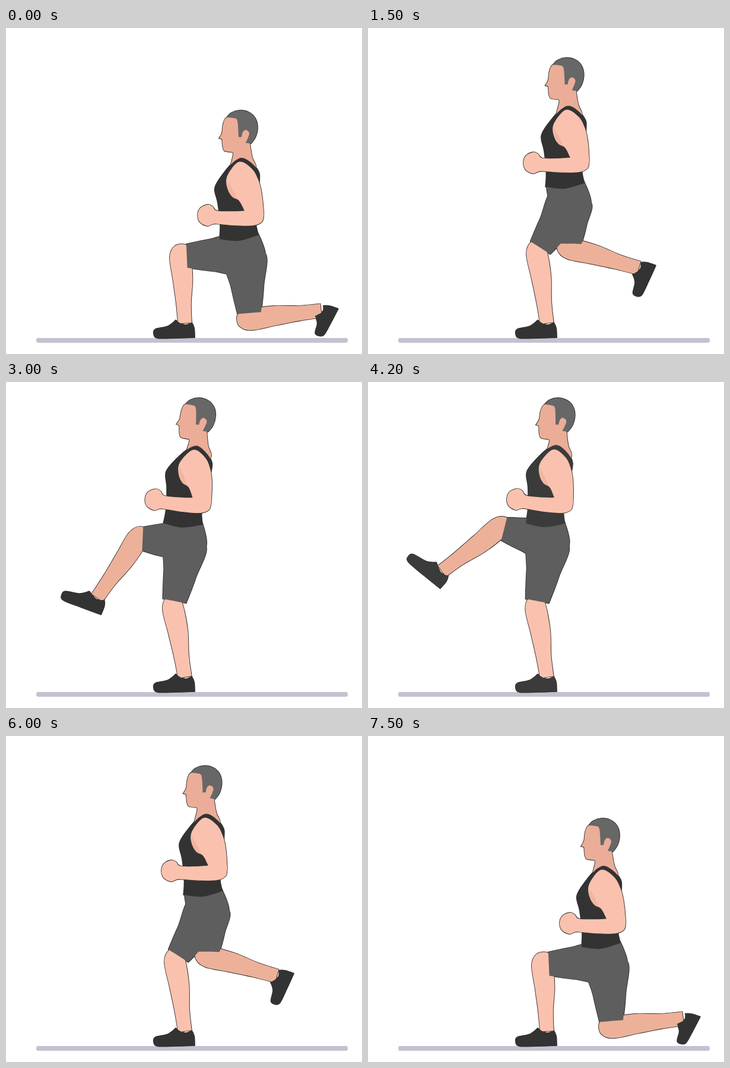
Write an HTML page with a canvas that moves like this. It is 600x550 px and loops after 7800 ms.

```html
<!DOCTYPE html>
<html lang="en">
<head>
<meta charset="utf-8">
<title>Lunge to front kick</title>
<style>
  html, body { margin: 0; width: 100%; height: 100%; overflow: hidden; background: #fff; }
  canvas { display: block; }
</style>
</head>
<body>
<canvas id="stage" width="600" height="550"></canvas>
<script>
const ctx = document.getElementById('stage').getContext('2d');
const STEP = 300, POSES = 13, SHIN = 121, HEM = .9;
const SKIN = '#fac2ae', FACE_SKIN = '#ebad97', FAR_SKIN = '#edb19a', SHORTS = '#5e5e5e', HAIR_GRAY = '#676767';

// Progress of each pose: 0 kneeling, 1 lunge, 2 knee up, 3 kick.
const PROGRESS = [0, .52, .6, 1, 1.33, 1.57, 1.85, 2, 2.15, 2.4, 2.75, 3, 3.06];

// Progress, then x, y of crown, chin, shoulder, elbow, fist, waist, near knee.
const BODY = [
  [0, 394, 139, 371, 208, 397, 245, 418, 318, 340, 316, 393, 353, 294, 385],
  [1, 360, 81, 340, 151, 370, 187, 398, 257, 321, 264, 379, 296, 294, 379],
  [2, 314, 27, 288, 96, 313, 134, 325, 206, 247, 200, 297, 242, 278, 380],
  [3, 320, 27, 294, 95, 315, 133, 329, 206, 251, 198, 299, 239, 283, 381]
];

// Progress, then far knee x, y, shin angle, foot angle, foot length.
const FAR_LEG = [
  [0, 411, 492, -7, 96, 41],
  [1, 436, 411, 32, 110, 46],
  [1.57, 340, 372, 16, 95, 46],
  [1.85, 268, 341, 33, 108, 48],
  [2, 226, 319, 70, 127, 53],
  [3, 221, 246, 143, 204, 60]
];

const NEAR_ANKLE = [301, 498], NEAR_TOE = [250, 515], HIP = [402, 380];

// Limb profiles: place along the bone, front width, back width.
const THIGH = [[0, 33, 33], [.5, 27, 28], [HEM, 20, 20]];
const CALF = [[-.16, 8, 11], [0, 18, 17], [.35, 15, 18], [.7, 12, 13], [1, 11, 12]];
const UPPER_ARM = [[-.23, 6, 7], [0, 26, 20], [.25, 30, 24], [.45, 26, 24], [.57, 17, 23], [.8, 13, 20], [1.1, 10, 13]];
const FOREARM = [[-.18, 3, 8], [0, 10, 15], [.4, 8, 16], [.8, 8, 14], [.9, 15, 15], [1, 18, 18], [1.15, 13, 13], [1.21, 5, 5]];

// Parts as drawn in the kneeling pose.
const FACE = [372,151, 366,162, 364,177, 359,186, 364,188, 365,198, 368,207, 379,209, 383,211, 381,222, 376,240,
  400,255, 421,237, 415,218, 411,194, 408,160, 392,148];
const HAIR = [372,151, 380,143, 394,139, 409,142, 420,152, 424,167, 421,183, 413,195, 404,194, 410,178,
  404,172, 399,176, 397,184, 392,184, 390,157, 384,152];
const TANK = [386,224, 366,246, 352,270, 357,295, 361,330, 360,356, 392,359, 426,349, 421,325, 427,262, 424,239, 402,220];
const HIPS = [361,352, 368,385, 385,412, 420,409, 437,383, 426,349];
const SHOE = [286,493, 301,501, 313,497, 317,506, 318,522, 285,523, 255,523, 249,516, 252,508, 273,503];

const pairs = flat => flat.flatMap((v, i) => i % 2 ? [] : [[v, flat[i + 1]]]);
const polar = ([x, y], deg, r) => [x + r * Math.cos(deg * Math.PI / 180), y + r * Math.sin(deg * Math.PI / 180)];

function sample(rows, u) {
  let i = 0;
  while (i < rows.length - 2 && u >= rows[i + 1][0]) i++;
  const [a, b] = [rows[i], rows[i + 1]], t = (u - a[0]) / (b[0] - a[0]);
  return a.map((v, j) => v + (b[j] - v) * t).slice(1);
}

// Distances along and across the bone a-b.
function frame(a, b) {
  const dx = b[0] - a[0], dy = b[1] - a[1], len = Math.hypot(dx, dy), x = dx / len, y = dy / len;
  return {
    len,
    out: ([t, n]) => [a[0] + t * x - n * y, a[1] + t * y + n * x],
    in: ([px, py]) => [(px - a[0]) * x + (py - a[1]) * y, (py - a[1]) * x - (px - a[0]) * y]
  };
}

function limb(a, b, rows) {
  const f = frame(a, b);
  return [...rows.map(([t, n]) => f.out([t * f.len, n])),
          ...rows.map(([t, , n]) => f.out([t * f.len, -n])).reverse()];
}

// Carries drawn points to a new bone; stretch changes length but not width.
function carry(points, from, to, stretch = false) {
  const f = frame(...from), g = frame(...to), k = stretch ? g.len / f.len : 1;
  return points.map(p => { const [t, n] = f.in(p); return g.out([t * k, n]); });
}

// Closed spline through the points; listed corners stay sharp.
function outline(p, corners = []) {
  const n = p.length, path = new Path2D(), at = i => p[(i + n) % n];
  const handle = (i, side) => {
    if (corners.includes(i % n)) return at(i);
    return at(i).map((v, c) => v + side * (at(i + 1)[c] - at(i - 1)[c]) / 6);
  };
  path.moveTo(...at(0));
  for (let i = 0; i < n; i++) path.bezierCurveTo(...handle(i, 1), ...handle(i + 1, -1), ...at(i + 1));
  path.closePath();
  return path;
}

const REST = pairs(BODY[0].slice(1));

function draw(pose) {
  const u = PROGRESS[pose];
  const dark = pose > 10 ? '#3b3b3b' : '#333333';
  const joints = pairs(sample(BODY, u));
  const waist = joints[5], nearKnee = joints[6];

  // The upper body leans back in the middle of the kick.
  const lean = u > 2 && u < 3 ? .045 * Math.sin(Math.PI * (u - 2)) : 0;
  const [crown, chin, shoulder, elbow, fist] = joints.map(([x, y]) => [x + lean * (waist[1] - y), y]);

  const head = pts => carry(pairs(pts), [REST[0], REST[1]], [crown, chin]);
  const torso = pts => carry(pts, [REST[5], REST[2]], [waist, shoulder]);
  const hip = torso([HIP])[0];

  const [kx, ky, shinAngle, footAngle, footLength] = sample(FAR_LEG, u);
  const farKnee = [kx, ky];
  const farAnkle = polar(farKnee, shinAngle, SHIN);
  const farToe = polar(farAnkle, footAngle, footLength);
  const shoe = (ankle, toe) => outline(carry(pairs(SHOE), [NEAR_ANKLE, NEAR_TOE], [ankle, toe], true), [0, 2, 4]);
  const thigh = knee => outline(limb(hip, knee, THIGH), [2, 3]);
  const calf = (knee, ankle) => outline(limb(knee, ankle, CALF), [4, 5]);

  const parts = [
    [calf(farKnee, farAnkle), FAR_SKIN],
    [shoe(farAnkle, farToe), dark],
    [calf(nearKnee, NEAR_ANKLE), SKIN],
    [shoe(NEAR_ANKLE, NEAR_TOE), dark],
    [thigh(farKnee), SHORTS],
    [thigh(nearKnee), SHORTS],
    [outline(torso(pairs(HIPS)), [0, 5]), SHORTS],
    [outline(head(FACE), [3, 7, 10]), FACE_SKIN],
    [outline(head(HAIR), [0, 7, 8, 12, 13]), HAIR_GRAY],
    [outline(torso(pairs(TANK)), [5, 7]), dark],
    [outline(limb(shoulder, elbow, UPPER_ARM)), SKIN],
    [outline(limb(elbow, fist, FOREARM)), SKIN]
  ];

  ctx.fillStyle = '#fff';
  ctx.fillRect(0, 0, 600, 550);
  ctx.fillStyle = '#c3c2d1';
  ctx.beginPath();
  ctx.roundRect(51, 523, 525, 8, 3);
  ctx.fill();

  // Thin edge around the whole figure, then the fills on top.
  ctx.strokeStyle = '#2e2c2b';
  ctx.lineWidth = 1.8;
  ctx.lineJoin = 'round';
  for (const [path] of parts) ctx.stroke(path);
  for (const [path, color] of parts) {
    ctx.fillStyle = color;
    ctx.fill(path);
  }

  // Soft shade at the armpit.
  const shade = [[.05, 27], [.28, 29], [.45, 25], [.52, 19], [.3, 22]];
  const arm = frame(shoulder, elbow);
  ctx.fillStyle = '#efb5a0';
  ctx.fill(outline(shade.map(([t, n]) => arm.out([t * arm.len, n])), [0, 3]));
}

let shown = -1;
const start = performance.now();
function tick(now) {
  const step = Math.floor(Math.max(0, now - start) / STEP) % (2 * POSES);
  const pose = step < POSES ? step : 2 * POSES - 1 - step;
  if (pose !== shown) draw(shown = pose);
  requestAnimationFrame(tick);
}
tick(start);
</script>
</body>
</html>
```
